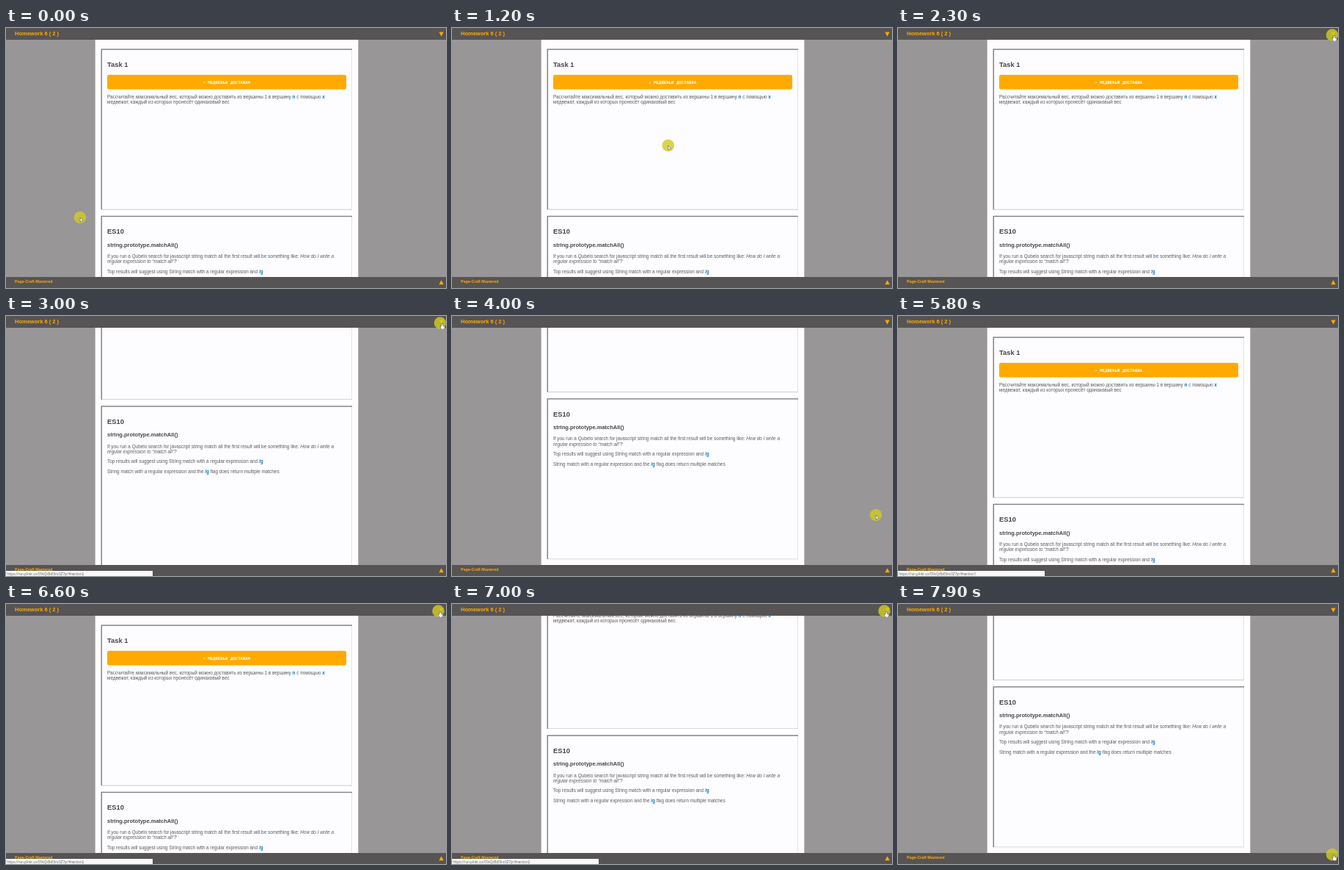
An HTML page with a canvas for the animation above (8 s loop, 600 by 354 pixels).

```html
<!DOCTYPE html>
<html lang="ru">
<head>
<meta charset="utf-8">
<style>
html, body { margin: 0; width: 100%; height: 100%; overflow: hidden; background: #989697; }
canvas { display: block; width: 600px; height: 354px; }
</style>
</head>
<body>
<canvas id="stage"></canvas>
<script>
const W = 600, H = 354, LOOP = 8000, STEP = 100;
const SANS = '"Liberation Sans", Arial, sans-serif';
const MONO = '"Liberation Mono", monospace';
const ORANGE = '#ffaa00', BLUE = '#0878c0', TEXT = '#5c5a5c', HEAD = '#464446', BAR = '#565455';
const LEFT = 138, PITCH = 227.4, MAX_SCROLL = 143.6;
const CLICK_DELAY = 300, SCROLL_MS = 543, HINT_IN = 100, HINT_OUT = 450;

const canvas = document.getElementById('stage');
const ctx = canvas.getContext('2d');
const dpr = window.devicePixelRatio || 1;
canvas.width = W * dpr;
canvas.height = H * dpr;

// Where the pointer rests; a stop with a section is a click on that section's link.
const stops = [
  { from: 0, until: 400, x: 101, y: 258 },
  { from: 2250, until: 3200, x: 592, y: 9.5, section: 2 },
  { from: 4000, until: 4000, x: 578, y: 271 },
  { from: 4550, until: 5450, x: 591, y: 346, section: 1 },
  { from: 5700, until: 6000, x: 614, y: 180 },
  { from: 6415, until: 7200, x: 589.5, y: 9.5, section: 2 },
  { from: 7800, until: LOOP, x: 592, y: 341 }
];
const visits = stops.filter(s => s.section);

const ease = p => 0.5 - 0.5 * Math.cos(Math.PI * Math.max(0, Math.min(1, p)));
const mix = (a, b, p) => a + (b - a) * p;

function scrollAt(t) {
  return visits.reduce((y, { from, section }) =>
    mix(y, (section - 1) * MAX_SCROLL, ease((t - from - CLICK_DELAY) / SCROLL_MS)), 0);
}

function pointerAt(t) {
  const i = stops.findIndex(s => t <= s.until);
  const next = stops[i], last = stops[Math.max(0, i - 1)];
  const p = t >= next.from ? 1 : ease((t - last.until) / (next.from - last.until));
  return [mix(last.x, next.x, p), mix(last.y, next.y, p)];
}

function rect(x, y, w, h, color) {
  ctx.fillStyle = color;
  ctx.fillRect(x, y, w, h);
}

function rounded(x, y, w, h, r, color) {
  ctx.beginPath();
  ctx.roundRect(x, y, w, h, r);
  ctx.fillStyle = color;
  ctx.fill();
}

// Isosceles triangle; a negative height points up.
function triangle(cx, y, w, h, color) {
  ctx.beginPath();
  ctx.moveTo(cx - w / 2, y);
  ctx.lineTo(cx + w / 2, y);
  ctx.lineTo(cx, y + h);
  ctx.closePath();
  ctx.fillStyle = color;
  ctx.fill();
}

function text(str, x, y, size, color = TEXT, style = '', family = SANS) {
  ctx.font = `${style} ${size}px ${family}`;
  ctx.fillStyle = color;
  ctx.fillText(str, x, y);
  return x + ctx.measureText(str).width;
}

// Draws a line of body text; *stars* mark links, _underscores_ mark italics.
function para(str, y) {
  let x = LEFT;
  for (const part of str.split(/(\*.*?\*|_.*?_)/)) {
    const mark = part[0], inner = part.slice(1, -1);
    if (mark === '*') x = text(inner, x, y, 6.38, BLUE, 'bold');
    else if (mark === '_') x = text(inner, x, y, 6.38, TEXT, 'italic');
    else x = text(part, x, y, 6.38);
  }
}

function panel(title) {
  const x = 129.5, y = 28.3, w = 342.5, h = 219, edge = 1.6;
  rect(x, y, w, h, '#868489');
  rect(x + edge, y + edge, w - edge, h - edge, '#dedde0');
  rect(x + edge, y + edge, w - edge - 0.8, h - edge - 0.8, '#fdfcfe');
  text(title, LEFT, 53, 9.4, HEAD, 'bold');
}

function taskPanel() {
  panel('Task 1');
  rounded(LEFT, 63.8, 326, 19.7, 2.2, ORANGE);
  ctx.textAlign = 'center';
  text('• МЕДВЕЖЬЯ ДОСТАВКА', 300.8, 75.7, 5.7, '#ffffff', 'bold', MONO);
  ctx.textAlign = 'left';
  para('Рассчитайте максимальный вес, который можно доставить из вершины 1 в вершину *n* с помощью *x*', 95.7);
  para('медвежат, каждый из которых пронесёт одинаковый вес', 102.9);
}

function lessonPanel() {
  panel('ES10');
  text('string.prototype.matchAll()', LEFT, 70.5, 7.53, HEAD, 'bold');
  para('If you run a Qubelo search for javascript string match all the first result will be something like: _How do I write a_', 85.7);
  para('_regular expression to “match all”?_', 92.8);
  para('Top results will suggest using String match with a regular expression and */g*', 106.2);
  para('String match with a regular expression and the */g* flag does return multiple matches', 119.9);
}

function page(scroll) {
  rect(121.7, 0, 358.6, H, '#ffffff');
  ctx.save();
  ctx.translate(0, -scroll);
  taskPanel();
  ctx.translate(0, PITCH);
  lessonPanel();
  ctx.restore();
}

function bars() {
  rect(0, 0, W, 16, BAR);
  rect(0, 339, W, 15, BAR);
  text('Homework 6 ( 2 )', 12, 10.3, 7.5, ORANGE, 'bold');
  text('Page-Craft Mastered', 12, 347.3, 5.3, ORANGE, 'bold');
  triangle(593.6, 5.5, 6.3, 6, ORANGE);
  triangle(593.6, 349.3, 6.3, -6, ORANGE);
}

function hint(section) {
  rect(0, 347, 200, 7, '#f9f9f9');
  text(`https://run.plnkr.co/O9sQrBzEXnc0Z7yr/#section${section}`, 1.2, 352.6, 4.5,
    '#555555', '', '"Open Sans", sans-serif');
}

function hand(x, y) {
  for (const [grow, color] of [[0.4, '#45433a'], [0, '#ffffff']]) {
    rounded(x - grow, y - grow, 1.5 + 2 * grow, 5 + 2 * grow, 0.7, color);
    rounded(x - 1.2 - grow, y + 2.8 - grow, 5.2 + 2 * grow, 4.2 + 2 * grow, 1.4, color);
  }
}

function arrow(x, y) {
  ctx.save();
  ctx.translate(x, y);
  ctx.rotate(-0.4);
  triangle(0, 5.6, 4.2, -5.6, '#ffffff');
  ctx.strokeStyle = '#45433a';
  ctx.lineWidth = 0.5;
  ctx.stroke();
  ctx.restore();
}

function pointer(x, y) {
  ctx.beginPath();
  ctx.arc(x, y, 8.3, 0, Math.PI * 2);
  ctx.fillStyle = 'rgba(208, 203, 38, 0.82)';
  ctx.fill();
  const onLink = x > 586 && (y < 17 || y > 338);
  if (onLink) hand(x + 2, y + 1.2);
  else arrow(x, y);
}

function draw(t) {
  ctx.setTransform(dpr, 0, 0, dpr, 0, 0);
  rect(0, 0, W, H, '#989697');
  page(scrollAt(t));
  bars();
  const shown = visits.find(v => t >= v.from + HINT_IN && t <= v.until + HINT_OUT);
  if (shown) hint(shown.section);
  pointer(...pointerAt(t));
}

const begin = performance.now();
function tick() {
  const t = (performance.now() - begin) % LOOP;
  draw(Math.floor(t / STEP) * STEP);
  requestAnimationFrame(tick);
}
tick();
</script>
</body>
</html>
```
